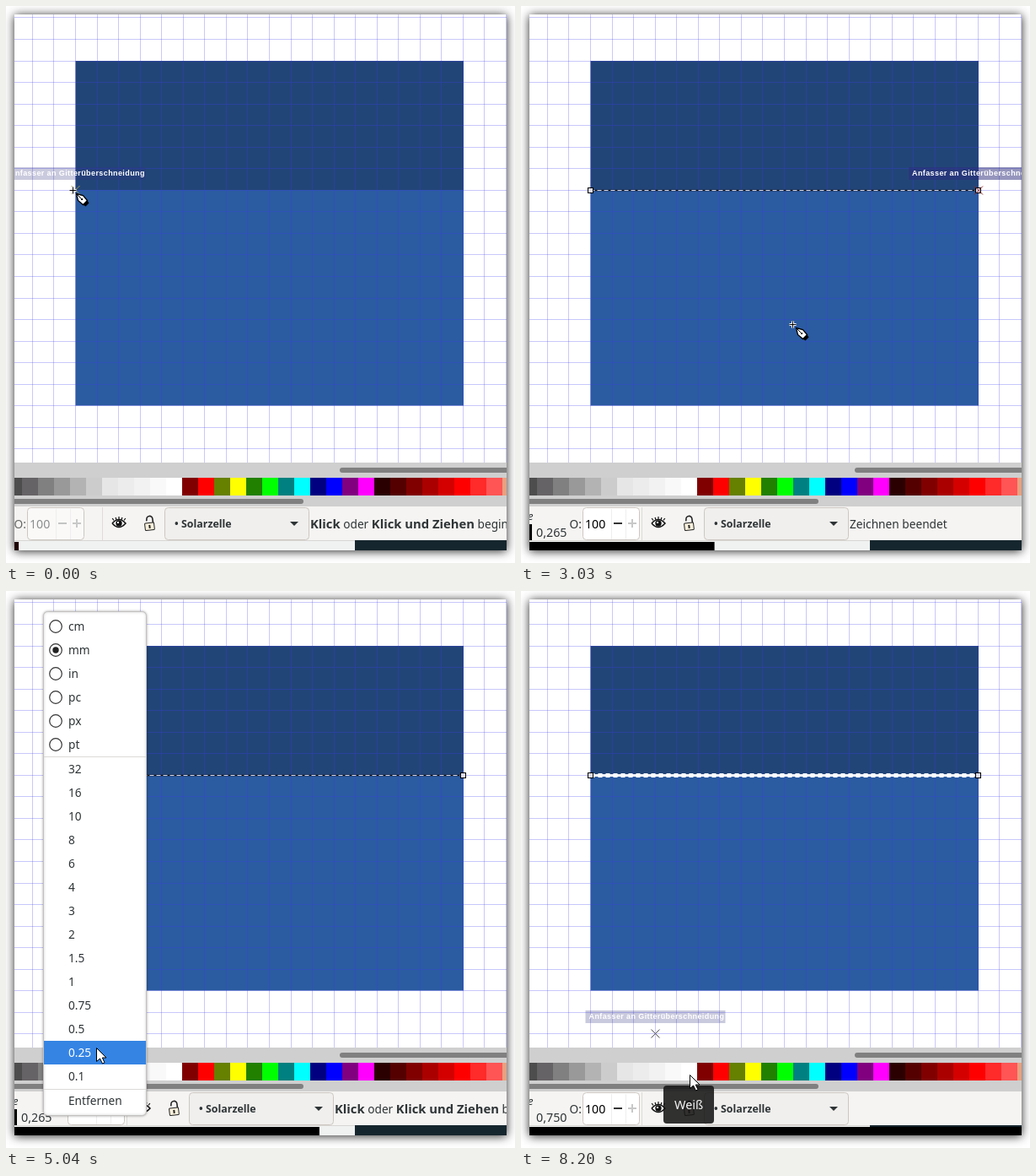
An HTML page with a canvas for the animation above (8270 ms loop, 604 by 660 pixels).

```html
<!DOCTYPE html>
<html lang="de">
<head>
<meta charset="utf-8">
<style>
html, body { margin: 0; width: 100%; height: 100%; overflow: hidden; background: #fff; }
canvas { display: block; }
</style>
</head>
<body>
<canvas id="stage" width="604" height="660"></canvas>
<script>
const ctx = document.getElementById('stage').getContext('2d');
const LOOP = 8270, CELL = 25.55, X0 = 82.5, X1 = 542.5, MID = 218;
const SANS = '"Noto Sans", "Open Sans", sans-serif';
const INK = '#2e3436';

// moments at which the interface changes
const T = { node: 480, finish: 2480, idle: 4250, menu: 4520, pick: 5380, ants: 5940,
            snap: 6300, arrow: 6390, swatch: 6520, hint: 7150, white: 7350 };

// time, x, y of the pointer
const PATH = [[0, 79, 218], [950, 79, 218], [1780, 540, 218], [2650, 540, 218], [3450, 70, 560],
  [3760, 45, 618], [4500, 45, 618], [5000, 107, 541], [5100, 107, 541], [5320, 107, 492],
  [5400, 107, 492], [5760, 124, 492], [6150, 124, 492], [6300, 158, 522], [6620, 197, 578],
  [7050, 197, 578], [7300, 200, 573], [LOOP, 200, 573]];

const PALETTE = ('#4d4d4d #666366 #808080 #999 #b3b3b3 #ccc #e6e6e6 #ececec #f2f2f2 #f9f9f9 #fff ' +
  '#800000 #f00 #668000 #ff0 #218000 #0f0 #008080 #0ff #000080 #00f #800080 #f0f #2b0000 #500 ' +
  '#800000 #a00 #d40000 #f00 #ff2a2a #f55 #e9a080').split(' ');

const UNITS = ['cm', 'mm', 'in', 'pc', 'px', 'pt'];
const WIDTHS = ['32', '16', '10', '8', '6', '4', '3', '2', '1.5', '1', '0.75', '0.5', '0.25', '0.1'];

function box(x, y, w, h, color) {
  ctx.fillStyle = color;
  ctx.fillRect(x, y, w, h);
}

function rounded(x, y, w, h, r, fill, stroke) {
  ctx.beginPath();
  ctx.roundRect(x, y, w, h, r);
  ctx.fillStyle = fill;
  ctx.fill();
  if (stroke) { ctx.strokeStyle = stroke; ctx.lineWidth = 1; ctx.stroke(); }
}

function text(s, x, y, color = INK, size = 13.7, style = '') {
  ctx.font = `${style} ${size}px ${SANS}`;
  ctx.fillStyle = color;
  ctx.fillText(s, x, y);
  return x + ctx.measureText(s).width;
}

function line(points, color, width = 1, dash = []) {
  ctx.beginPath();
  points.forEach(([x, y]) => ctx.lineTo(x, y));
  ctx.strokeStyle = color;
  ctx.lineWidth = width;
  ctx.setLineDash(dash);
  ctx.stroke();
  ctx.setLineDash([]);
}

function polygon(points, fill, stroke, width = 1) {
  ctx.beginPath();
  points.forEach(([x, y]) => ctx.lineTo(x, y));
  ctx.closePath();
  ctx.fillStyle = fill;
  ctx.fill();
  if (stroke) {
    ctx.strokeStyle = stroke;
    ctx.lineWidth = width;
    ctx.stroke();
  }
}

function pointer(t) {
  const i = PATH.findIndex(p => p[0] > t);
  const [ta, xa, ya] = PATH[i - 1], [tb, xb, yb] = PATH[i];
  const u = (t - ta) / (tb - ta), e = u * u * (3 - 2 * u);
  return [Math.round(xa + (xb - xa) * e), Math.round(ya + (yb - ya) * e)];
}

function frame() {
  ctx.save();
  ctx.shadowColor = 'rgba(0,0,0,.85)';
  ctx.shadowBlur = 11;
  ctx.shadowOffsetY = 1;
  box(10, 10, 584, 635, '#fff');
  ctx.restore();
}

function drawing() {
  box(X0, 65, X1 - X0 + .5, MID - 65, '#224578');
  box(X0, MID, X1 - X0 + .5, 255.5, '#2b5ba1');
  const grid = 'rgba(60,60,240,.28)';
  for (let x = X0 - 2 * CELL; x < 595; x += CELL) {
    const px = Math.floor(x) + .5;
    line([[px, 10], [px, 541]], grid);
  }
  for (let y = 65 - 2 * CELL; y < 541; y += CELL) {
    const py = Math.floor(y) + .5;
    line([[10, py], [594, py]], grid);
  }
}

function node(x) {
  box(x - 3.5, 215, 7, 7, '#000');
  box(x - 2.5, 216, 5, 5, '#dde');
}

function segment(t) {
  if (t < T.finish) {
    if (t >= T.node) node(X0);
    return;
  }
  const ends = [[X0, 218.5], [X1, 218.5]];
  if (t < T.pick) {
    line(ends, '#101018', 1.6);
    line(ends, '#d5d5e6', 1, [5, 3]);
  } else if (t < T.ants) {
    line(ends, '#000', 4.5);
    line(ends, '#d0d0dc', 1.2, [5, 3]);
  } else if (t < T.white) {
    line(ends, '#05053c', 5);
    line(ends, '#c4c4dc', 1.2, [4, 4]);
  } else {
    line(ends, '#f4f4ff', 3);
    line(ends, '#fff', 5, [5, 4]);
  }
  node(X0);
  node(X1);
}

function cross(x, y, color) {
  line([[x - 5, y - 5], [x + 5, y + 5]], color);
  line([[x - 5, y + 5], [x + 5, y - 5]], color);
}

function snapLabel(x, y, alpha) {
  box(x - 83, y - 27, 166, 15, `rgba(45,45,125,${alpha})`);
  ctx.font = 'bold 9px "Liberation Sans", Arial, sans-serif';
  ctx.letterSpacing = '0.4px';
  ctx.fillStyle = '#fff';
  ctx.fillText('Anfasser an Gitterüberschneidung', x - 79, y - 17);
  ctx.letterSpacing = '0px';
}

function snapping(t) {
  if (t < T.finish) {
    if (t < T.node) cross(82.5, 218, '#a5a04a');
    snapLabel(83, MID, t < 150 ? .25 : .5);
  } else if (t < T.menu) {
    cross(543, 218.5, '#8c2a2a');
    snapLabel(543, MID, .5);
  } else if (t >= T.snap) {
    cross(159.5, 524.5, '#555');
    snapLabel(159.5, 524, t < T.snap + 200 ? .5 : .25);
  }
}

function palette() {
  box(10, 541, 584, 52, '#cfcfcf');
  PALETTE.forEach((c, i) => box(i * 19, 559, 19, 21, c));
  rounded(396, 547, 220, 6, 3, '#808080');
  rounded(-10, 584, 363, 6, 3, '#808080');
}

function eye(x, y) {
  ctx.beginPath();
  ctx.moveTo(x - 8, y + 1);
  ctx.quadraticCurveTo(x, y - 8, x + 8, y + 1);
  ctx.quadraticCurveTo(x, y + 10, x - 8, y + 1);
  ctx.fillStyle = '#fff';
  ctx.fill();
  ctx.strokeStyle = '#111';
  ctx.lineWidth = 1.5;
  ctx.stroke();
  ctx.beginPath();
  ctx.arc(x, y + 1, 3.7, 0, 7);
  ctx.fillStyle = '#111';
  ctx.fill();
  box(x - 2, y - 1, 2, 2, '#fff');
  for (const d of [-6, -3, 0, 3, 6])
    line([[x + d, y - 4 + Math.abs(d) / 4], [x + d * 1.3, y - 7 + Math.abs(d) / 3]], '#111', 1.2);
}

function lock(x, y) {
  ctx.save();
  ctx.translate(x, y);
  ctx.rotate(-.12);
  ctx.beginPath();
  ctx.moveTo(-3, -3);
  ctx.arc(1, -5, 3.5, Math.PI, 0);
  ctx.lineTo(4.5, 0);
  ctx.strokeStyle = '#222';
  ctx.lineWidth = 1.6;
  ctx.stroke();
  rounded(-5.5, -.5, 11, 8.5, 1, '#f8f0dc', '#222');
  box(-1, 2, 2, 4, '#222');
  ctx.restore();
}

function status(t, x) {
  let parts = ['', '*Klick', ' oder ', '*Klick und Ziehen', ' beginnt einen Pfad'];
  if (t >= T.white) parts = [];
  else if (t >= T.swatch) parts = ['Farbe: ', '*Weiß', '; ', '*Klick', ' legt die Füllung fest'];
  else if (t >= T.finish && t < T.idle) parts = ['Zeichnen beendet'];
  for (const p of parts)
    x = p[0] === '*' ? text(p.slice(1), x, 619, INK, 14.8, 'bold') : text(p, x, 619);
}

function toolbar(t) {
  const active = t >= T.finish, d = active ? 29 : 0, e = active ? 48 : 0;
  box(10, 593, 584, 41, '#f5f4f2');
  if (active) {
    text('e', 8, 609, INK, 13, 'italic');
    if (t < T.white) box(10, 614, 3, 19, '#000');
    text(t < T.pick ? '0,265' : '0,750', 18, 629, INK, 14.3);
  }
  text('O:', 9.5 + e, 619, active ? INK : '#666');
  rounded(25.5 + e, 594.5, 67, 38, 4, active ? '#fff' : '#faf9f8', '#cdc7c2');
  text('100', 28 + e, 619, active ? '#000' : '#8b8e8f', 14.2);
  line([[59.5 + e, 596], [59.5 + e, 632]], '#eee');
  line([[76.5 + e, 596], [76.5 + e, 632]], '#eee');
  box(62 + e, 612, 10, 2, active ? '#333' : '#c4c4c4');
  box(79 + e, 612, 10, 2, '#c8c8c8');
  box(83 + e, 608, 2, 10, '#c8c8c8');
  line([[114.5 + d, 594], [114.5 + d, 633]], '#dedbd8');
  eye(134 + d, 612);
  lock(170 + d, 613);
  rounded(188.5 + d, 594.5, 171, 38, 4, '#f0efed', '#cdc7c2');
  text('•', 200 + d, 618, INK, 12.4, 'bold');
  text('Solarzelle', 208 + d, 618, INK, 12.4, 'bold');
  polygon([[337 + d, 611], [347 + d, 611], [342 + d, 616]], INK);
  status(t, 361 + d);
}

function progress(t) {
  box(10, 633, 584, 1, '#d8d6d3');
  box(10, 634, 404, 11, '#f0f2f2');
  box(414, 633, 180, 12, '#16262e');
  box(10, 635, 5 + t * .0708, 10, t < 70 ? '#200000' : '#000');
}

function menu(py) {
  ctx.save();
  ctx.shadowColor = 'rgba(0,0,0,.3)';
  ctx.shadowBlur = 3;
  rounded(44.5, 24.5, 122, 597, 5, '#fff', '#c4c2c0');
  ctx.restore();
  const row = (s, y) => {
    const hot = Math.abs(py + 6 - y) < 14;
    if (hot) box(45, y - 14, 121, 28, '#3584e4');
    text(s, 74, y + 5, hot ? '#fff' : INK);
  };
  UNITS.forEach((s, i) => {
    const y = 42 + 28 * i;
    row(s, y);
    ctx.beginPath();
    ctx.arc(59, y, 7.3, 0, 7);
    ctx.fillStyle = '#fff';
    ctx.fill();
    ctx.strokeStyle = '#333';
    ctx.lineWidth = 1.2;
    ctx.stroke();
    if (s === 'mm') {
      ctx.beginPath();
      ctx.arc(59, y, 3.7, 0, 7);
      ctx.fillStyle = '#222';
      ctx.fill();
    }
  });
  WIDTHS.forEach((s, i) => row(s, 211 + 28 * i));
  row('Entfernen', 604);
  box(45, 196, 121, 1, '#dcdad8');
  box(45, 590, 121, 1, '#dcdad8');
}

function pen(x, y) {
  ctx.save();
  ctx.translate(x + .5, y + .5);
  for (const [color, w] of [['#fff', 3], ['#000', 1]]) {
    line([[-4, 0], [4, 0]], color, w);
    line([[0, -4], [0, 4]], color, w);
  }
  polygon([[4, 4], [12, 6], [17, 12], [12, 17], [6, 12]], '#fff', '#000', 1.3);
  line([[4, 4], [10, 10]], '#000');
  box(9.5, 9.5, 2, 2, '#000');
  polygon([[17, 12], [19, 15], [15, 19], [12, 17]], '#000');
  ctx.restore();
}

function arrow(x, y) {
  ctx.save();
  ctx.translate(x + .5, y + .5);
  polygon([[0, 0], [0, 16], [4, 12.5], [7, 18.5], [9.5, 17.3], [6.8, 11.5], [11.5, 11.5]], '#fff', '#000');
  ctx.restore();
}

function draw(t) {
  const [x, y] = pointer(t);
  const open = t >= T.menu && t < T.pick;
  box(0, 0, 604, 660, '#fff');
  frame();
  ctx.save();
  ctx.beginPath();
  ctx.rect(10, 10, 584, 635);
  ctx.clip();
  drawing();
  segment(t);
  snapping(t);
  palette();
  toolbar(t);
  progress(t);
  if (open) menu(y);
  if (t >= T.hint) {
    rounded(169, 586, 60, 45, 4, 'rgba(22,22,22,.88)');
    text('Weiß', 182, 614, '#f4f4f4', 14.5);
  }
  (open || t >= T.arrow ? arrow : pen)(x, y);
  ctx.restore();
}

const start = performance.now();
function tick() {
  draw((performance.now() - start) % LOOP);
  requestAnimationFrame(tick);
}
tick();
</script>
</body>
</html>
```
